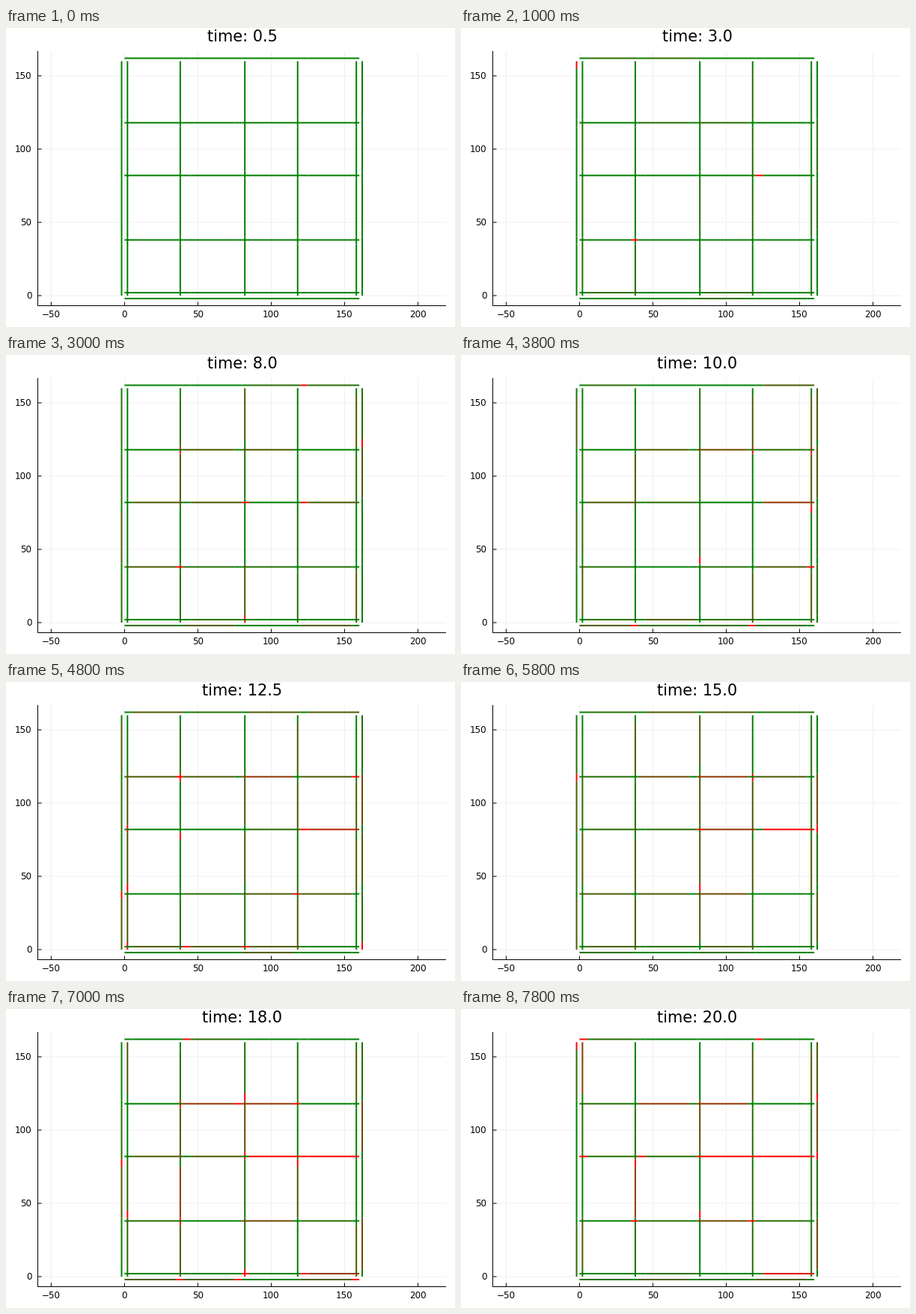
Recreate the animation shown at these times as a matplotlib script. Size 600 by 400 pixels, loop 8000 ms.

```python
import numpy as np
import matplotlib.pyplot as plt
from matplotlib.animation import FuncAnimation
from matplotlib.collections import LineCollection

W, H, DPI = 600, 400, 100
FRAMES, STEP_MS = 40, 200
BLOCK, HEAD, CAPACITY = 40, 5, 7
GREEN, RED = np.array([0, 128, 0]) / 255, np.array([1.0, 0, 0])
PX = 72 / DPI

# Lane position -> direction of travel; later lanes are drawn on top.
COLUMNS = {-2: 1, 2: -1, 38: 1, 82: -1, 118: 1, 158: 1, 162: -1}
ROWS = {-2: 1, 2: -1, 38: 1, 82: -1, 118: 1, 162: -1}

# Blocks that jam: (axis, lane, block) -> first frame, last frame, cars at the end.
JAMS = {
    ("h", 82, 3): (8, 29, 7),
    ("h", 82, 2): (22, 34, 7),
    ("h", 118, 1): (0, 39, 4),
    ("h", 118, 2): (0, 24, 4),
    ("h", 2, 3): (29, 39, 6),
    ("h", 38, 2): (10, 30, 3),
    ("v", 38, 1): (24, 35, 4),
    ("v", 82, 2): (10, 36, 3),
    ("v", 162, 2): (0, 24, 3),
    ("v", 162, 0): (15, 35, 3),
    ("v", 2, 3): (29, 39, 4),
}

plt.rcParams["font.family"] = "DejaVu Sans"
rng = np.random.default_rng(7)
frames = np.arange(FRAMES)
ramp = np.clip(frames / 16, 0, 1)


def sx(x):
    return 158.4 + 1.9605 * x


def sy(y):
    return 358 - 1.96 * y


def queue(key):
    """Cars waiting in a block at every frame."""
    phase, speed = rng.uniform(0, 2 * np.pi), rng.uniform(0.2, 0.4)
    if key in JAMS:
        start, end, peak = JAMS[key]
        cars = peak * np.clip((frames - start) / (end - start), 0, 1)
    else:
        cars = ramp * (1.1 + 0.9 * np.sin(phase + speed * frames))
    return np.round(cars)


def exit_cell(cars):
    """One car stands at the exit for part of each signal cycle."""
    cycle, phase = rng.uniform(8, 14), rng.random()
    share = ramp * (0.08 + 0.08 * cars)
    return (frames / cycle + phase) % 1 < share


def segment(axis, lane, a, b):
    ends = [(a, lane), (b, lane)] if axis == "h" else [(lane, a), (lane, b)]
    return [(sx(x), sy(y)) for x, y in ends]


segments, fills = [], []
for axis, lanes in (("v", COLUMNS), ("h", ROWS)):
    for lane, way in lanes.items():
        for block in range(4):
            entry, leave = block * BLOCK, (block + 1) * BLOCK
            if way < 0:
                entry, leave = leave, entry
            stop = leave - way * HEAD
            cars = queue((axis, lane, block))
            segments += [segment(axis, lane, entry, stop),
                         segment(axis, lane, stop, leave)]
            fills += [cars / CAPACITY, exit_cell(cars)]
fills = np.array(fills, float)

fig = plt.figure(figsize=(W / DPI, H / DPI), dpi=DPI, facecolor="white")
ax = fig.add_axes([0, 0, 1, 1])
ax.set(xlim=(0, W), ylim=(H, 0))
ax.axis("off")


def rule(x0, y0, x1, y1, color="black"):
    ax.plot([x0, x1], [y0, y1], color=color, lw=PX, snap=False,
            solid_capstyle="butt", zorder=1)


LEFT, RIGHT, TOP, BOTTOM = 42.5, 588, 30.8, 371.5
for v in range(-50, 201, 50):
    x = sx(v)
    rule(x, TOP, x, BOTTOM, "#f0f0f0")
    rule(x, BOTTOM, x, BOTTOM - 5)
    ax.text(x, 387.3, str(v).replace("-", "\u2212"), size=8.6, ha="center", va="baseline")
for v in range(0, 151, 50):
    y = sy(v)
    rule(LEFT, y, RIGHT, y, "#f0f0f0")
    rule(LEFT, y, LEFT + 5, y)
    ax.text(34.5, y + 4.4, str(v), size=8.6, ha="right", va="baseline")
rule(LEFT, TOP, LEFT, BOTTOM + 0.5)
rule(LEFT - 0.5, BOTTOM, RIGHT, BOTTOM)

title = ax.text(315.5, 18.3, "", size=15, ha="center", va="baseline")
streets = LineCollection(segments, linewidths=2 * PX, capstyle="butt", zorder=2)
streets.set_snap(False)
ax.add_collection(streets, autolim=False)


def draw(i):
    streets.set_color(GREEN + (RED - GREEN) * fills[:, i, None])
    title.set_text(f"time: {0.5 * (i + 1):.1f}")
    return streets, title


anim = FuncAnimation(fig, draw, frames=FRAMES, interval=STEP_MS,
                     init_func=lambda: draw(0), repeat=True, repeat_delay=0)
plt.show()
```
